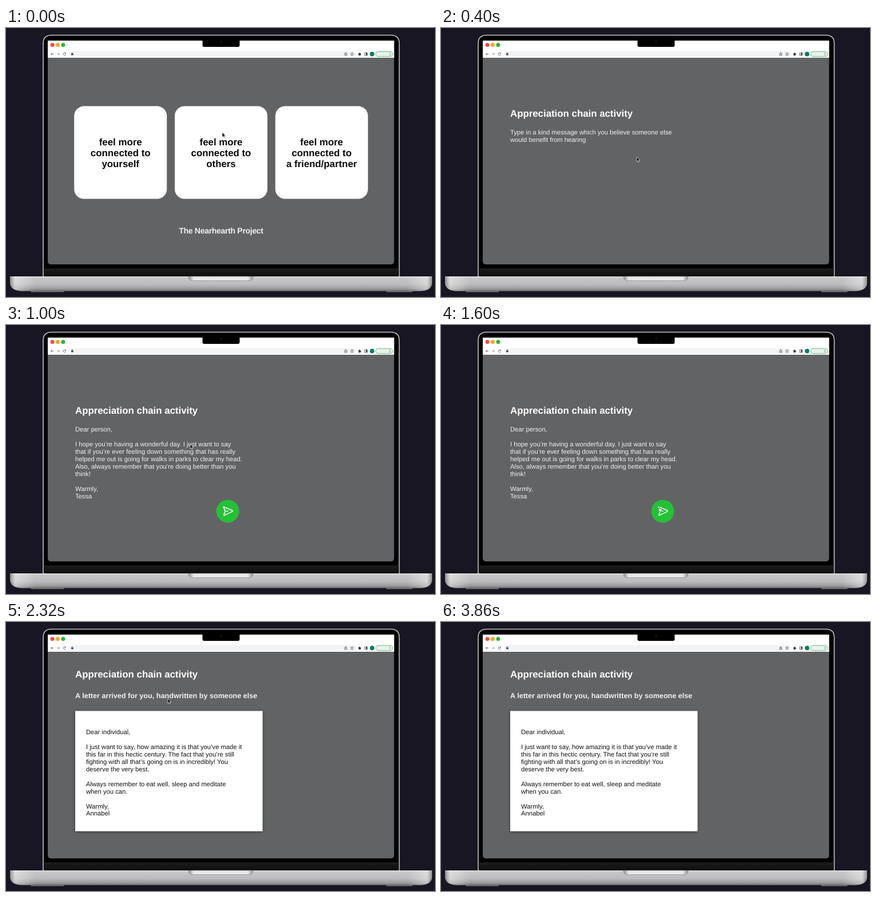
Animation, 750 px wide and 470 px high, one loop 4 s. Source, as an HTML page:

```html
<!DOCTYPE html>
<html lang="en">
<head>
<meta charset="utf-8">
<title>Appreciation chain activity</title>
<style>
html, body { margin: 0; width: 100%; height: 100%; overflow: hidden; background: #181623; }
svg { display: block; width: 750px; height: 470px; }
text {
  font-family: "Liberation Sans", Arial, sans-serif;
  font-size: 11.22px;
  fill: #f1f1f1;
  text-rendering: geometricPrecision;
}
.title { font-size: 16.83px; font-weight: 700; fill: #fff; }
.sub { font-size: 12.62px; font-weight: 700; }
.choice { font-size: 16.85px; font-weight: 700; fill: #0b0b0b; text-anchor: middle; }
.brand { font-size: 14px; font-weight: 700; letter-spacing: -.3px; text-anchor: middle; }
.ink { fill: #111; }
.icon { fill: none; stroke: #4a4d51; stroke-width: .8; }
.scene { opacity: 0; }
</style>
</head>
<body>
<svg viewBox="0 0 750 470">
  <defs>
    <linearGradient id="metal" x2="0" y2="1">
      <stop offset="0" stop-color="#dededf"/>
      <stop offset=".12" stop-color="#c6c6c8"/>
      <stop offset=".55" stop-color="#bcbcbe"/>
      <stop offset=".85" stop-color="#9a9a9d"/>
      <stop offset="1" stop-color="#6d6d70"/>
    </linearGradient>
    <linearGradient id="sides">
      <stop offset="0" stop-color="#555" stop-opacity=".5"/>
      <stop offset=".012" stop-color="#fff" stop-opacity=".4"/>
      <stop offset=".06" stop-color="#fff" stop-opacity="0"/>
      <stop offset=".94" stop-color="#fff" stop-opacity="0"/>
      <stop offset=".988" stop-color="#fff" stop-opacity=".4"/>
      <stop offset="1" stop-color="#555" stop-opacity=".5"/>
    </linearGradient>
    <linearGradient id="lip">
      <stop offset="0" stop-color="#8b8b8e"/>
      <stop offset=".08" stop-color="#e8e8e9"/>
      <stop offset=".92" stop-color="#e8e8e9"/>
      <stop offset="1" stop-color="#8b8b8e"/>
    </linearGradient>
    <linearGradient id="chin" x2="0" y2="1">
      <stop offset="0" stop-color="#1d1d1e"/>
      <stop offset="1" stop-color="#0d0d0e"/>
    </linearGradient>
    <filter id="shade" x="-10%" y="-10%" width="120%" height="120%">
      <feDropShadow dx="0" dy="1" stdDeviation="2.5" flood-opacity=".45"/>
    </filter>
    <clipPath id="view"><path d="M73 22H678.500V407Q678.500 413 672.500 413H79Q73 413 73 407Z"/></clipPath>
  </defs>

  <!-- laptop -->
  <path d="M65 434V27Q65 12.500 79.500 12.500H673Q687.500 12.500 687.500 27V434Z" fill="#000" stroke="#c3c3c5" stroke-width="1.600"/>
  <rect x="66.500" y="420" width="620" height="14" fill="url(#chin)"/>
  <path d="M42 458H101V461.500H44ZM665 458H712L710 461.500H665Z" fill="#6f6f72"/>
  <g id="base">
    <path d="M7 434H745V444Q745 459.800 722 459.800H30Q7 459.800 7 444Z" fill="url(#metal)"/>
    <path d="M7 434H745V444Q745 459.800 722 459.800H30Q7 459.800 7 444Z" fill="url(#sides)"/>
  </g>
  <path d="M319 434H432Q432 441.500 424 441.500H327Q319 441.500 319 434Z" fill="url(#lip)" stroke="#858588" stroke-width=".7"/>

  <!-- browser -->
  <g clip-path="url(#view)">
    <rect x="73" y="22" width="606" height="391" fill="#626365"/>
    <rect x="73" y="22" width="606" height="30" fill="#fff"/>
  </g>
  <circle cx="81" cy="29.600" r="3.500" fill="#fc4943"/>
  <circle cx="90.500" cy="29.600" r="3.500" fill="#fba51c"/>
  <circle cx="99.900" cy="29.600" r="3.500" fill="#22b83b"/>
  <rect x="110" y="40.300" width="502" height="10" rx="5" fill="#f1f3f4"/>
  <g class="icon">
    <path d="M83 45.500H78.700M80.500 43.500L78.500 45.500L80.500 47.500"/>
    <path d="M89 45.500H93.300M91.500 43.500L93.500 45.500L91.500 47.500" stroke="#8b8e92"/>
    <path d="M104 44.200A2.100 2.100 0 1 0 104.300 46.300M104.400 42.800V44.500H102.700"/>
    <path d="M114.800 45V44.200A1.100 1.100 0 0 1 117 44.200V45"/>
    <path d="M593 44.700H592.200V48H595.800V44.700H595M594 46.500V42.800M592.900 43.800L594 42.700L595.100 43.800"/>
    <path d="M605 42.700L605.800 44.500L607.700 44.700L606.300 46L606.700 48L605 47L603.300 48L603.700 46L602.300 44.700L604.200 44.500Z" stroke-width=".7"/>
    <rect x="627" y="43.200" width="4.400" height="4.600"/>
  </g>
  <rect x="114.100" y="44.700" width="3.600" height="2.700" fill="#3b3e42"/>
  <path d="M616 44H617.200A.9 .9 0 0 1 619 44H620V45.200A.9 .9 0 0 1 620 47V48H616V46.800A.8 .8 0 0 0 616 45.200Z" fill="#3b3e42"/>
  <rect x="629.400" y="43" width="2.200" height="5" fill="#3b3e42"/>
  <circle cx="640" cy="45.500" r="3.900" fill="#087c61"/>
  <rect x="646.200" y="41" width="29.800" height="9" rx="4.500" fill="#e8f2ea" stroke="#4f9c68" stroke-width=".8"/>
  <path d="M671.200 43.200V48" stroke="#23733f" stroke-width="1.100" stroke-dasharray="1 .9"/>
  <path d="M343.500 21H408.500V30Q408.500 33 405.500 33H346.500Q343.500 33 343.500 30Z" fill="#000"/>
  <circle cx="376" cy="24" r="1.800" fill="#15171f"/>

  <g id="menu" class="scene"></g>
  <g id="prompt" class="scene"></g>
  <g id="write" class="scene">
    <circle cx="387.600" cy="325.400" r="20" fill="#24c135"/>
    <path d="M380.500 318.600Q379.500 317.500 381.300 318L395.600 324.100Q397 325 395.600 325.900L382.200 332.400Q380.300 333 381 331.300L383.200 325.300ZM383.200 325.300H388.200" fill="none" stroke="#fff" stroke-width="1.600" stroke-linejoin="round" stroke-linecap="round"/>
  </g>
  <g id="read" class="scene">
    <rect x="121" y="155.500" width="327.500" height="210" fill="#fff" filter="url(#shade)"/>
  </g>

  <g id="cursor">
    <path id="arrow" d="M0 0V8.300L1.900 6.600L3.200 9.500L4.600 8.900L3.300 6H5.900Z" fill="#060606" stroke="#fff" stroke-width=".7" stroke-linejoin="round"/>
    <path id="hand" d="M1.500 .8Q2.400 0 3 1V3.600L6 4.300Q7 4.700 6.700 6L6 8.800H2.700L.2 5.800Q0 4.700 1.500 5.200Z" fill="#fff" stroke="#222" stroke-width=".6" stroke-linejoin="round"/>
  </g>
</svg>
<script>
const LOOP = 4000;
const NS = "http://www.w3.org/2000/svg";
const $ = id => document.getElementById(id);

function add(parent, tag, attrs, content = "") {
  const el = document.createElementNS(NS, tag);
  for (const key in attrs) el.setAttribute(key, attrs[key]);
  el.textContent = content;
  return parent.appendChild(el);
}

// One text element per row; empty rows leave a gap.
function rows(parent, cls, x, y, step, list) {
  list.forEach((row, i) => row && add(parent, "text", { class: cls, x, y: y + i * step }, row));
}

const choices = ["yourself", "others", "a friend/partner"];
choices.forEach((who, i) => {
  const x = 119.2 + i * 175.8;
  add($("menu"), "rect", { x, y: 136.6, width: 162, height: 162, rx: 17, fill: "#fff" });
  rows($("menu"), "choice", x + 81, 204.5, 19.3, ["feel more", "connected to", who]);
});
rows($("menu"), "brand", 376, 358.8, 0, ["The Nearhearth Project"]);

const heading = "Appreciation chain activity";
rows($("prompt"), "title", 121, 155.2, 0, [heading]);
rows($("prompt"), "", 121, 186.2, 13, [
  "Type in a kind message which you believe someone else",
  "would benefit from hearing"
]);

rows($("write"), "title", 121, 155.2, 0, [heading]);
rows($("write"), "", 121, 186.2, 12.97, [
  "Dear person,",
  "",
  "I hope you’re having a wonderful day. I just want to say",
  "that if you’re ever feeling down something that has really",
  "helped me out is going for walks in parks to clear my head.",
  "Also, always remember that you’re doing better than you",
  "think!",
  "",
  "Warmly,",
  "Tessa"
]);

rows($("read"), "title", 121, 97.2, 0, [heading]);
rows($("read"), "sub", 121, 132.8, 0, ["A letter arrived for you, handwritten by someone else"]);
rows($("read"), "ink", 140, 195.8, 12.97, [
  "Dear individual,",
  "",
  "I just want to say, how amazing it is that you’ve made it",
  "this far in this hectic century. The fact that you’re still",
  "fighting with all that’s going on is in incredibly! You",
  "deserve the very best.",
  "",
  "Always remember to eat well, sleep and meditate",
  "when you can.",
  "",
  "Warmly,",
  "Annabel"
]);

const timing = { duration: LOOP, iterations: Infinity };
const moves = [];

// Hard on/off switch: opacity values as [time, value] pairs.
function toggle(id, steps) {
  const frames = steps.map(([t, opacity]) => ({ offset: t / LOOP, opacity, easing: "step-end" }));
  frames.push({ offset: 1, opacity: steps[steps.length - 1][1] });
  moves.push($(id).animate(frames, timing));
}

toggle("menu", [[0, 1], [400, 0]]);
toggle("prompt", [[0, 0], [400, 1], [1000, 0]]);
toggle("write", [[0, 0], [1000, 1], [1680, 0]]);
toggle("read", [[0, 0], [1680, 1]]);
toggle("arrow", [[0, 1], [1540, 0], [1680, 1]]);
toggle("hand", [[0, 0], [1540, 1], [1680, 0]]);
toggle("cursor", [[0, 1], [3200, 0]]);

// Pointer path: time, x, y
const path = [
  [0, 378, 182.3], [20, 378, 182.3],
  [240, 342, 225.2], [480, 342, 225.2],
  [900, 322, 208], [1010, 322, 208],
  [1520, 379.5, 317.3], [2000, 379.5, 317.3],
  [2320, 282.8, 133.6], [2600, 282.8, 133.6],
  [3100, 287, 139.5], [3120, 287, 139.5],
  [3180, 15, 215], [4000, 15, 215]
];
moves.push($("cursor").animate(path.map(([t, x, y]) => ({
  offset: t / LOOP,
  transform: `translate(${x}px, ${y}px)`,
  easing: t === 3120 ? "linear" : "ease-in-out"
})), timing));

const start = document.timeline.currentTime || 0;
moves.forEach(move => { move.startTime = start; });
</script>
</body>
</html>
```
